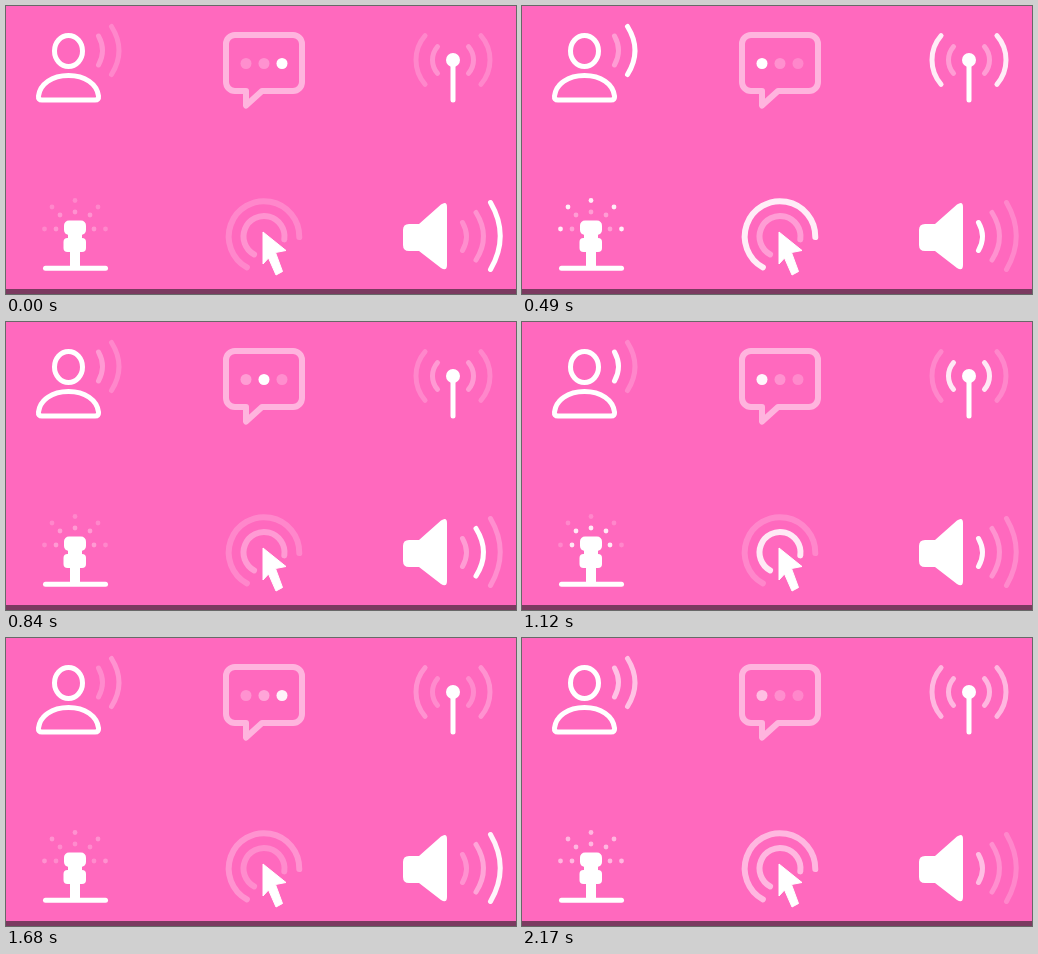
Write an HTML page that moves like this. It is 510 by 288 pixels and loops after 2240 ms.

```html
<!DOCTYPE html>
<html lang="en">
<head>
<meta charset="utf-8">
<title>Signal icons</title>
<style>
  html, body { margin: 0; width: 100%; height: 100%; overflow: hidden; background: #ff69be; }
  svg { display: block; width: 100vw; height: 100vh; }
  .line { fill: none; stroke: #fff; stroke-width: 5; stroke-linecap: round; stroke-linejoin: round; }
  .wide { stroke-width: 6; }
  .fill { fill: #fff; }
</style>
</head>
<body>
<svg viewBox="0 0 510 288">
  <rect width="510" height="288" fill="#ff69be"/>
  <rect y="283" width="510" height="5" fill="#7b3a60"/>

  <g class="line">
    <ellipse cx="62.5" cy="45" rx="14" ry="15.5"/>
    <path d="M36 94Q32 94 32.5 90C34 78 46 69.5 62.5 69.5S91 78 92.5 90Q93 94 89 94Z"/>
    <path data-track="inner" data-boost="1.15" d="M92.5 30Q100.5 44.5 92.5 59"/>
    <path data-track="outer" data-boost="1.15" d="M105.5 20.5Q120.5 44.5 105.5 68.5"/>
  </g>

  <path class="line wide" opacity=".5" d="M229 29H287a9 9 0 0 1 9 9V76a9 9 0 0 1-9 9H256L240 99.500V85H229a9 9 0 0 1-9-9V38a9 9 0 0 1 9-9Z"/>
  <g class="fill">
    <circle data-track="first" cx="240" cy="57.500" r="5.500"/>
    <circle data-track="second" cx="258" cy="57.500" r="5.500"/>
    <circle data-track="third" cx="276" cy="57.500" r="5.500"/>
  </g>

  <circle class="fill" cx="447" cy="54" r="7"/>
  <path class="line" d="M447 54V94"/>
  <g id="antenna" class="line"></g>

  <path class="line" d="M39.500 262.300H99.500"/>
  <g class="fill">
    <rect x="64" y="218" width="10" height="44"/>
    <rect x="62" y="226" width="14" height="10"/>
    <rect x="58" y="214.500" width="22" height="14.500" rx="5"/>
    <rect x="57.500" y="232" width="22.500" height="14" rx="4"/>
  </g>
  <g id="beacon" class="fill"></g>

  <g id="ripples" class="line wide"></g>
  <path class="fill" stroke="#fff" stroke-linejoin="round" d="M257 226L280 244.500L269.500 246.500L276.500 265.500L270 269L262.500 252L257 258Z"/>

  <path class="fill" d="M403 218H413L435 198.500Q441 194.500 441 201V259Q441 265.500 435 262L413 245H403Q397 245 397 239V224Q397 218 403 218Z"/>
  <g class="line">
    <path data-track="first" d="M456.500 216.500Q464.500 230.500 456.500 244.500"/>
    <path data-track="second" d="M470 206.500Q485 230.500 470 254"/>
    <path data-track="third" d="M484.500 196.500Q504 230 484.500 263.500"/>
  </g>
</svg>
<script>
const STEP = 70, LOOP = 2240;

// Opacity of each wave at the shared key steps.
const keys = [0, 3.5, 7, 12, 14, 16, 20, 24, 28, 31];
const tracks = {
  inner:  [.28, .8, .35, .33, .6, .85, .45, .23, .85, .52],
  outer:  [.2, .25, .88, .2, .2, .2, .77, .28, .22, .52],
  first:  [.25, .3, 1, .35, .5, .95, .45, .28, .9, .57],
  second: [.28, .25, .27, 1, .45, .28, .78, .4, .22, .25],
  third:  [1, .4, .2, .25, .5, .22, .22, .92, .35, .2]
};

function levelAt(values, step) {
  let i = 0;
  while (i < keys.length - 2 && step > keys[i + 1]) i++;
  const f = (step - keys[i]) / (keys[i + 1] - keys[i]);
  const ease = f * f * (3 - 2 * f);
  return values[i] + (values[i + 1] - values[i]) * ease;
}

function add(parent, tag, track, attrs) {
  const el = document.createElementNS("http://www.w3.org/2000/svg", tag);
  el.dataset.track = track;
  for (const name in attrs) el.setAttribute(name, attrs[name]);
  document.getElementById(parent).append(el);
}

function arc(cx, cy, r, from, to) {
  const point = deg => {
    const a = deg * Math.PI / 180;
    return `${cx + r * Math.cos(a)} ${cy + r * Math.sin(a)}`;
  };
  return `M${point(from)}A${r} ${r} 0 ${to - from > 180 ? 1 : 0} 1 ${point(to)}`;
}

for (const [track, r] of [["inner", 20.5], ["outer", 37]])
  for (const side of [0, 180])
    add("antenna", "path", track, { d: arc(447, 54, r, side - 41, side + 41) });

for (const [track, r] of [["inner", 20.5], ["outer", 35.3]])
  add("ripples", "path", track, { d: arc(258, 230.5, r, 119, r > 30 ? 361 : 368) });

const beacon = {
  inner: [[0, 206], [15, 209], [19, 223]],
  outer: [[0, 194.5], [23, 201], [30.5, 223]]
};
for (const track in beacon)
  for (const [dx, cy] of beacon[track])
    for (const side of dx ? [-1, 1] : [1])
      add("beacon", "circle", track, { cx: 69 + side * dx, cy, r: 2.4 });

const waves = [...document.querySelectorAll("[data-track]")];

function draw(ms) {
  const step = Math.floor((ms % LOOP) / STEP);
  for (const el of waves) {
    const level = levelAt(tracks[el.dataset.track], step);
    const boost = level > .5 ? +(el.dataset.boost || 1) : 1;
    el.setAttribute("opacity", Math.min(1, level * boost).toFixed(3));
  }
}

const start = performance.now();
function tick() {
  draw(performance.now() - start);
  requestAnimationFrame(tick);
}
tick();
</script>
</body>
</html>
```
